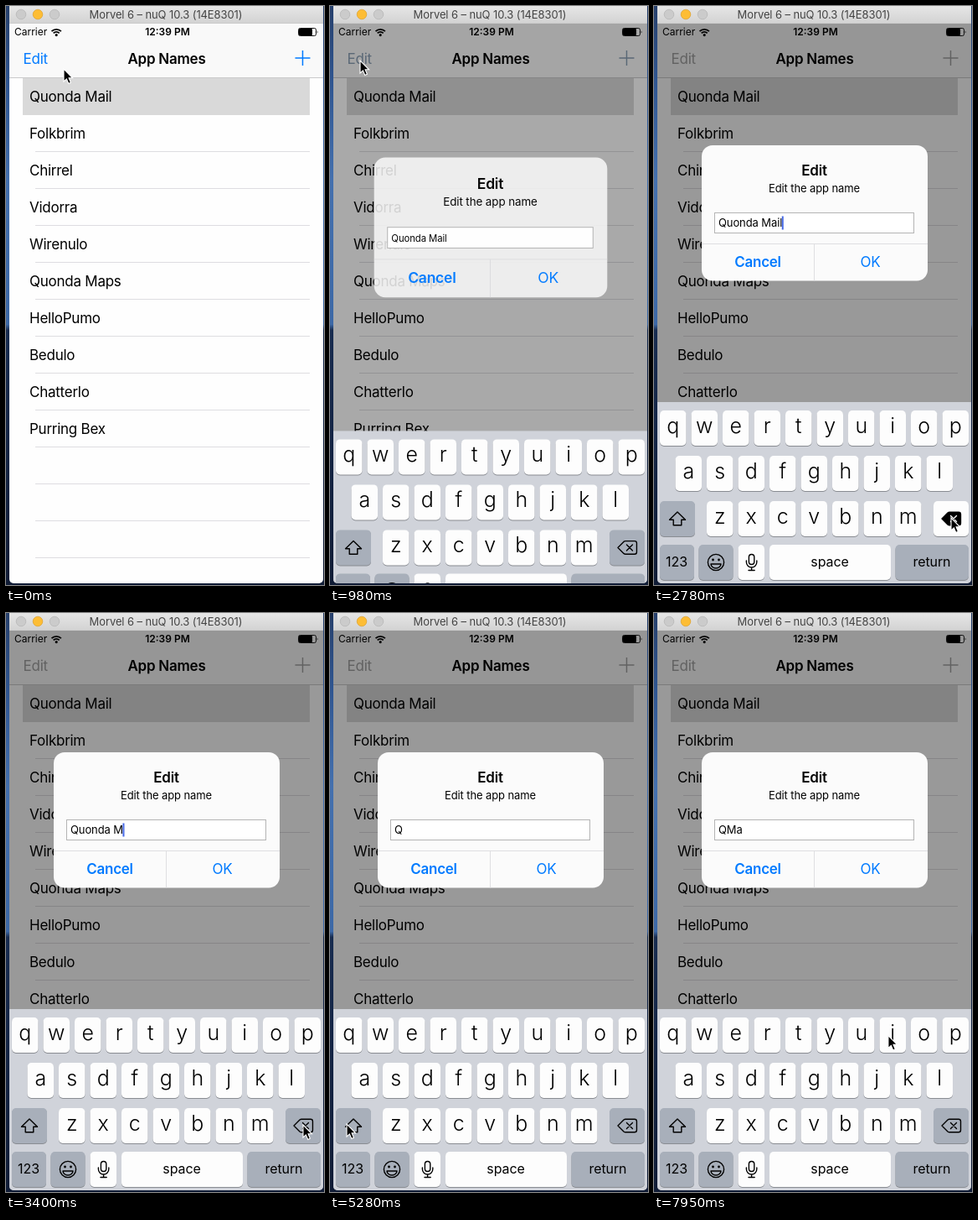
Animation, 380 px wide and 690 px high, one loop 8000 ms. Source, as an HTML page:

```html
<!DOCTYPE html>
<html lang="en">
<head>
<meta charset="utf-8">
<title>App names</title>
<style>
  html, body { margin: 0; width: 100%; height: 100%; overflow: hidden; background: #14233f; }
  svg { display: block; width: 380px; height: 690px; font-family: Inter, Roboto, sans-serif; }
  text { white-space: pre; }
  .t17 { font-size: 17px; letter-spacing: -.25px; }
  .t13 { font-size: 13px; letter-spacing: -.1px; }
  .t12 { font-size: 12px; }
  .semi { font-weight: 600; }
  .mid { text-anchor: middle; }
  .blue { fill: #007aff; }
  .line { fill: none; stroke: #000; stroke-width: 1.4; stroke-linejoin: round; stroke-linecap: round; }
  .letter { font-weight: 350; text-anchor: middle; }
  .caps .letter { font-weight: 400; }
  .word { font-size: 16px; text-anchor: middle; letter-spacing: -.1px; }
</style>
</head>
<body>
<svg viewBox="0 0 380 690">
  <defs>
    <linearGradient id="desk" x2="0" y2="1">
      <stop offset="0" stop-color="#27406c"/>
      <stop offset=".13" stop-color="#2f5590"/>
      <stop offset=".3" stop-color="#4470ae"/>
      <stop offset=".55" stop-color="#3c68a6"/>
      <stop offset=".56" stop-color="#182c50"/>
      <stop offset="1" stop-color="#101c36"/>
    </linearGradient>
    <linearGradient id="bar" x2="0" y2="1">
      <stop offset="0" stop-color="#e6e6e6"/>
      <stop offset="1" stop-color="#d3d3d3"/>
    </linearGradient>
    <clipPath id="win"><rect x="4" y="-10" width="375" height="698" rx="5"/></clipPath>
    <filter id="soft" x="-30%" y="-30%" width="160%" height="160%">
      <feDropShadow dx="0" dy="1" stdDeviation="2.5" flood-opacity=".35"/>
    </filter>
  </defs>

  <rect width="380" height="690" fill="url(#desk)"/>
  <g clip-path="url(#win)">
    <rect x="4" width="375" height="690" fill="#fefefe"/>
    <g id="list"></g>

    <rect x="4" y="20" width="375" height="65" fill="#f9f9f9"/>
    <rect x="4" y="85" width="375" height="1" fill="#cacacb"/>
    <text class="t12" x="10" y="35">Carrier</text>
    <g fill="none" stroke="#000" stroke-width="1.8">
      <path d="M54.5 30.2a8 8 0 0 1 11.4 0M56.7 32.4a5 5 0 0 1 7 0"/>
      <circle cx="60.2" cy="34.6" r=".7"/>
    </g>
    <text class="t12 semi mid" x="193" y="35">12:39 PM</text>
    <rect x="349.5" y="26.5" width="21" height="9" rx="2" fill="none" stroke="#000" stroke-width=".9"/>
    <rect x="350" y="27" width="16" height="8" rx="1"/>
    <path d="M371.8 29.3q1.6 1.7 0 3.4z"/>
    <text id="edit" class="t17" x="20.5" y="69">Edit</text>
    <text class="t17 semi mid" x="192" y="69">App Names</text>
    <path id="plus" d="M345.5 62h18M354.5 53v18" stroke-width="1.5"/>

    <rect id="dim" x="4" y="20" width="375" height="670"/>

    <g id="alert">
      <rect id="panel" x="57" y="166" width="270" height="161.5" rx="13" fill="#fbfbfb"/>
      <g id="parts">
        <text class="t17 semi mid" x="191.5" y="202">Edit</text>
        <text class="t13 mid" x="191.5" y="222">Edit the app name</text>
        <rect x="72.5" y="246.5" width="238" height="24" fill="#fff" stroke="#b4b4b4"/>
        <text id="field" x="77" y="263" letter-spacing="-.1"></text>
        <rect id="caret" y="250.5" width="2" height="16" fill="#4568e6"/>
        <path d="M57 283.5h270M191.5 283.5v44" stroke="#d9d9dc" stroke-width=".8"/>
        <text class="t17 semi mid blue" x="124" y="311">Cancel</text>
        <text class="t17 mid blue" x="258.5" y="311">OK</text>
      </g>
    </g>

    <g id="board">
      <rect x="4" y="472" width="375" height="220" fill="#d0d3da"/>
      <g id="keys"></g>
      <path id="shift" class="line" d="M28 603L37.5 612.3H32.8V618.8H23.2V612.3H18.5Z"/>
      <path id="del" class="line" d="M344 611L351 604Q352 603.2 353 603.2H364Q366.5 603.2 366.5 605.7V616.3Q366.5 618.8 364 618.8H353Q352 618.8 351 618Z"/>
      <path id="cross" class="line" d="M354.5 607.5l7 7m0-7l-7 7"/>
      <circle class="line" cx="74" cy="663" r="9.6"/>
      <circle cx="70.5" cy="660" r="1.4"/><circle cx="77.5" cy="660" r="1.4"/>
      <path class="line" d="M68 665h12a6 5 0 0 1-12 0z"/>
      <rect class="line" x="113.4" y="653.5" width="6.4" height="12" rx="3.2"/>
      <path class="line" d="M110.4 661v1.8a6.2 6.2 0 0 0 12.4 0V661M116.6 669v3.5M113 672.5h7.2"/>
      <g id="pop" filter="url(#soft)">
        <path fill="#fdfdfd" d="M-20 -65H20Q29 -65 29 -56V-23C29 -8 16 -10 16 4V37Q16 42 11 42H-11Q-16 42 -16 37V4C-16 -10 -29 -8 -29 -23V-56Q-29 -65 -20 -65Z"/>
        <text id="popText" class="letter" y="-23" font-size="37"></text>
      </g>
    </g>

    <rect x="4" width="375" height="20" fill="url(#bar)"/>
    <rect x="4" y="20" width="375" height="1" fill="#cbcbcb"/>
    <g stroke-width=".7">
      <circle cx="18" cy="10" r="5.8" fill="#cbcbcb" stroke="#b3b3b3"/>
      <circle cx="38" cy="10" r="5.8" fill="#fdbd35" stroke="#dc9f2c"/>
      <circle cx="58" cy="10" r="5.8" fill="#cbcbcb" stroke="#b3b3b3"/>
    </g>
    <text class="t13 mid" x="191" y="15" fill="#444">Morvel 6 – nuQ 10.3 (14E8301)</text>
  </g>
  <path id="mouse" d="M0 0V15L3.4 11.9L5.8 17.4L8.4 16.2L6.1 10.8H10.6Z" stroke="#fff" stroke-width="1.1"/>
</svg>

<script>
const LOOP = 8000, TICK = 89.5;
const NAME = 'Quonda Mail';
const APPS = [NAME, 'Folkbrim', 'Chirrel', 'Vidorra', 'Wirenulo', 'Quonda Maps',
  'HelloPumo', 'Bedulo', 'Chatterlo', 'Purring Bex'];

// Pointer path: time, x, y
const PATH = [
  [0, 69, 75], [270, 36, 65], [1160, 36, 65], [1340, 81, 134], [1520, 155, 228],
  [1700, 220, 308], [1790, 220, 308], [1970, 305, 537], [2150, 305, 537],
  [2600, 355, 610], [4570, 355, 610], [4660, 285, 619], [4840, 142, 612],
  [5100, 77, 609], [5190, 6, 606], [5280, 20, 609], [5640, 20, 609],
  [5950, 150, 629], [6270, 296, 615], [6630, 296, 615], [7080, 41, 560],
  [7340, 41, 560], [7510, 252, 520], [7690, 252, 520], [7950, 291, 497]
];
// Letters left in the field while deleting
const LEFT = [[0, 11], [2870, 10], [3140, 9], [3320, 8], [3490, 7], [3760, 6],
  [3850, 5], [3940, 4], [4120, 3], [4300, 2], [4390, 1]];
const CARET = [[1880, 2330], [2690, 5100], [5550, 6000], [6360, 7080], [7390, 7860]];
const DELETE = [[2780, 2960], [3050, 3140], [3230, 3320], [3410, 3490], [3670, 3760], [3850, 4480]];
const CAPS = [[5550, 6540]];
const POPS = [[6360, 6540, 'M', 303.8, 590], [7200, 7400, 'a', 41.2, 536]];

const $ = id => document.getElementById(id);
const set = (node, attrs) => {
  for (const k in attrs) node.setAttribute(k, attrs[k]);
  return node;
};
const add = (parent, tag, attrs, text = '') => {
  const node = set(document.createElementNS('http://www.w3.org/2000/svg', tag), attrs);
  node.textContent = text;
  return parent.appendChild(node);
};
const during = (spans, t) => spans.find(s => t >= s[0] && t < s[1]);
const last = (steps, t) => steps.filter(s => s[0] <= t).pop()[1];

// List
add($('list'), 'rect', { x: 20, y: 86, width: 343, height: 44, fill: '#d9d9d9' });
for (let i = 0; i < 13; i++) {
  if (i) add($('list'), 'rect', { x: 35, y: 129 + 44 * i, width: 328, height: 1, fill: '#dedde1' });
  if (APPS[i]) add($('list'), 'text', { class: 't17', x: 28, y: 113.5 + 44 * i }, APPS[i]);
}

// Keyboard
function key(x, y, width, fill = '#fdfdfd') {
  add($('keys'), 'rect', { x, y: y + 1, width, height: 42, rx: 5, fill: '#898c92' });
  return add($('keys'), 'rect', { x, y, width, height: 42, rx: 5, fill });
}
const GREY = '#a8afba';
const letters = [];
[['qwertyuiop', 7], ['asdfghjkl', 25.5], ['zxcvbnm', 63]].forEach(([row, left], r) => {
  [...row].forEach((char, i) => {
    const x = left + 37.5 * i, y = 482 + 54 * r;
    key(x, y, 31.5);
    letters.push({ char, y, node: add($('keys'), 'text', { class: 'letter', x: x + 15.75 }) });
  });
});
const shiftKey = key(7, 590, 42, GREY);
const delKey = key(334, 590, 42, GREY);
key(7, 642, 41, GREY);
key(53.5, 642, 41, GREY);
key(100.5, 642, 31.5);
key(138, 642, 145);
key(288.5, 642, 87.5, GREY);
[['123', 27], ['space', 210], ['return', 332]].forEach(([word, x]) =>
  add($('keys'), 'text', { class: 'word', x, y: 668 }, word));

function pointer(t) {
  const i = PATH.findIndex(p => p[0] > t);
  if (i < 0) return PATH[PATH.length - 1].slice(1);
  const [t0, x0, y0] = PATH[i - 1], [t1, x1, y1] = PATH[i];
  const f = (t - t0) / (t1 - t0);
  return [x0 + (x1 - x0) * f, y0 + (y1 - y0) * f];
}

// Critically damped spring shared by alert, dimming and keyboard
function spring(t) {
  if (t >= 1340) return 1;
  const s = Math.max(0, t - 655) / 100;
  return 1 - (1 + s) * Math.exp(-s);
}

function showSheet(t, p) {
  const rest = 1 - p;
  set($('dim'), { opacity: .4 * p });
  set($('board'), { transform: `translate(0 ${216 * rest})` });
  set($('panel'), { opacity: p });
  set($('parts'), { opacity: Math.min(1, 1.15 * p) });
  set($('alert'), {
    transform: `translate(191.8 ${246.7 + 108 * rest}) scale(${1 + .2 * rest}) translate(-191.8 -246.7)`
  });
  const tint = `color-mix(in srgb, #a2a2a2 ${p * 100}%, #007aff)`;
  $('edit').style.fill = tint;
  $('plus').style.stroke = tint;
  set($('edit'), { opacity: t >= 450 && t < 620 ? .25 : 1 });
}

function showField(t) {
  const typed = t >= 7400 ? 'Ma' : t >= 6540 ? 'M' : '';
  const field = $('field');
  field.textContent = NAME.slice(0, last(LEFT, t)) + typed;
  set(field, { 'font-size': t < 1250 ? 11 : 13 });
  set($('caret'), {
    x: 77 + field.getComputedTextLength() - .5,
    opacity: during(CARET, t) ? 1 : 0
  });
}

function showKeys(t) {
  const caps = !!during(CAPS, t), del = !!during(DELETE, t), pop = during(POPS, t);
  $('keys').classList.toggle('caps', caps);
  for (const { char, y, node } of letters) {
    node.textContent = caps ? char.toUpperCase() : char;
    set(node, { y: y + (caps ? 29 : 27), 'font-size': caps ? 23.5 : 25 });
  }
  set(shiftKey, { fill: caps ? '#fdfdfd' : GREY });
  set(delKey, { fill: del ? '#fdfdfd' : GREY });
  $('shift').style.fill = caps ? '#000' : 'none';
  $('del').style.fill = del ? '#000' : 'none';
  $('cross').style.stroke = del ? '#fff' : '#000';
  $('pop').style.display = pop ? '' : 'none';
  if (pop) {
    $('popText').textContent = pop[2];
    set($('pop'), { transform: `translate(${pop[3]} ${pop[4]})` });
  }
}

function draw(t) {
  const held = Math.floor(t / TICK + .1) * TICK;
  const [x, y] = pointer(held);
  set($('mouse'), { transform: `translate(${x} ${y})` });
  showSheet(t, spring(held));
  showField(t);
  showKeys(t);
}

const start = performance.now();
function frame() {
  draw((performance.now() - start) % LOOP);
  requestAnimationFrame(frame);
}
frame();
</script>
</body>
</html>
```
